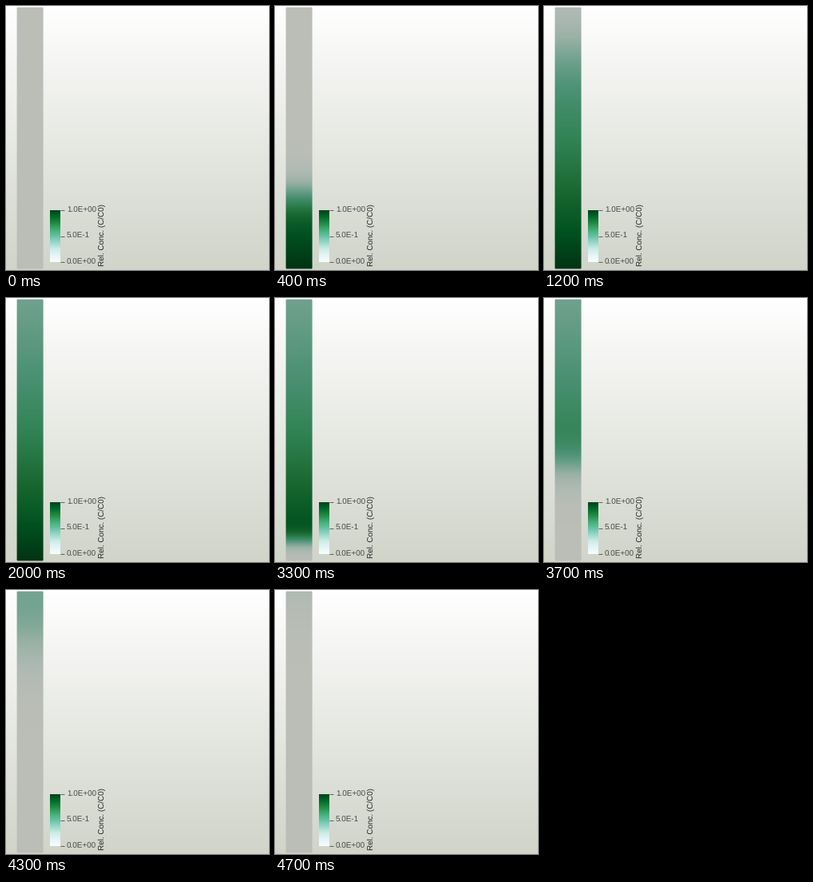
Recreate the animation shown at these times as a matplotlib script. Size 329 by 331 pixels, loop 8700 ms.

```python
import math

import numpy as np
import matplotlib.pyplot as plt
from matplotlib.animation import FuncAnimation
from matplotlib.colors import LinearSegmentedColormap, ListedColormap
from matplotlib.patches import FancyBboxPatch

W, H = 329, 331
STEP_MS, FRAMES = 100, 87
FILL_STEPS, FLUSH_START, FLUSH_STEPS = 20, 32, 15
FILL_SPEED, FLUSH_SPEED, SPREAD = 24.8, 23.6, 11.5
DECAY = 0.0029
TOP, BOTTOM, LEFT, RIGHT = 1, 330, 13, 47

plt.rcParams["text.hinting"] = "none"
green = plt.get_cmap("BuGn", 512)
light = np.array([0.757, 0.754, 0.72])
shaded = ListedColormap(green(np.arange(512))[:, :3] * light)
sky = LinearSegmentedColormap.from_list("sky", ["#ffffff", "#d0d4c9"])

erfc = np.vectorize(math.erfc)
height = 329 - (np.arange(TOP, BOTTOM) + 0.5)
steady = np.exp(-DECAY * height)


def front(steps, speed):
    """Share of the fluid replaced at each height by a spreading front."""
    if steps <= 0:
        return np.zeros_like(height)
    width = SPREAD * math.sqrt(2 * steps)
    return 0.5 * erfc((height - speed * steps) / width)


def concentration(i):
    filled = front(i, FILL_SPEED) if i < FILL_STEPS else 1
    flushed = front(min(i - FLUSH_START, FLUSH_STEPS), FLUSH_SPEED)
    return steady * filled * (1 - flushed)


fig = plt.figure(figsize=(W / 100, H / 100), dpi=100)
ax = fig.add_axes([0, 0, 1, 1])
ax.axis("off")


def gradient(values, cmap, box):
    return ax.imshow(np.reshape(values, (-1, 1)), cmap=cmap, vmin=0, vmax=1,
                     extent=box, aspect="auto", interpolation="nearest")


gradient(np.linspace(0, 1, H), sky, (0, W, H, 0))
column = gradient(concentration(0), shaded, (LEFT, RIGHT, BOTTOM, TOP))
outline = FancyBboxPatch((LEFT + 0.6, TOP + 0.6),
                         RIGHT - LEFT - 1, BOTTOM - TOP - 1.1,
                         boxstyle="round,pad=0,rounding_size=1.2",
                         fc="none", ec="none")
ax.add_patch(outline)
column.set_clip_path(outline)
gradient(np.linspace(1, 0, 65), green, (55, 68, 321, 256))

ink = "#4a4a4a"
font = dict(family="Liberation Sans", size=9.85 * 0.72)
for level, label in enumerate(["0.0E+00", "5.0E-1", "1.0E+00"]):
    y = 321 - 32.5 * level
    ax.plot([68, 73], [y, y], color=ink, lw=0.6, solid_capstyle="butt")
    ax.text(75.8, y - 0.8, label, color=ink, va="center_baseline", **font)
ax.text(120.8, 287.5, "Rel. Conc. (C/C0)", color="#242424", rotation=90,
        ha="center", va="center", **font)

ax.set_xlim(0, W)
ax.set_ylim(H, 0)


def update(i):
    column.set_data(concentration(i).reshape(-1, 1))
    return [column]


anim = FuncAnimation(fig, update, frames=FRAMES, interval=STEP_MS,
                     repeat=True, repeat_delay=0, blit=False)
plt.show()
```
